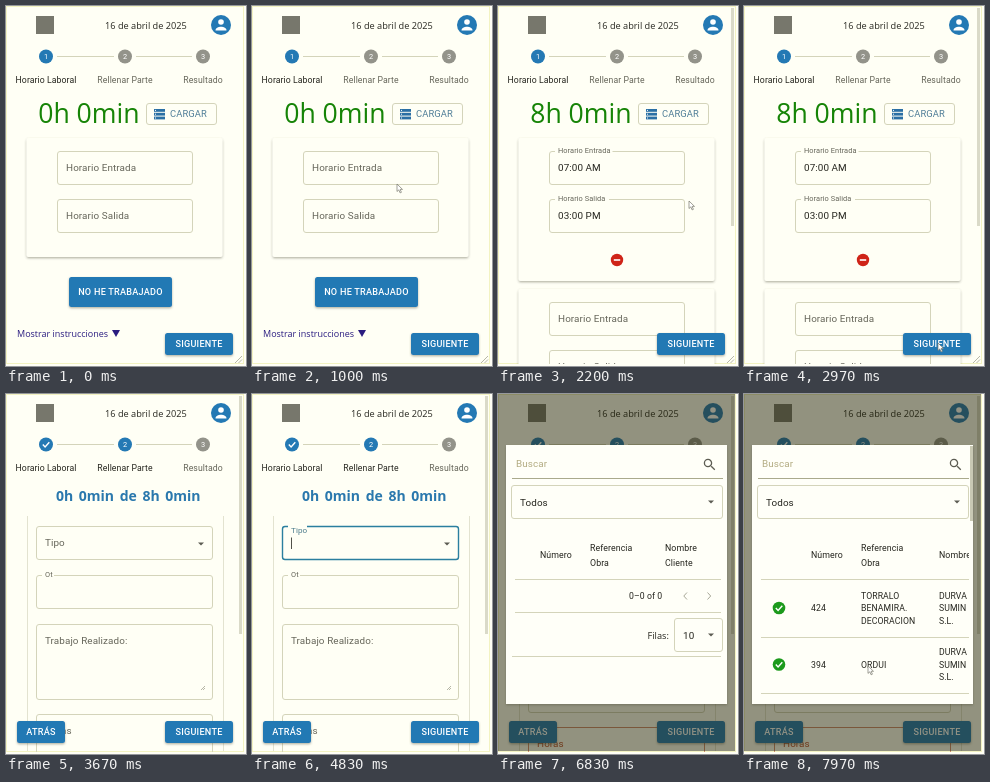
Recreate the animation shown at these times as an HTML page. Size 240 by 360 pixels, loop 8000 ms.

```html
<!DOCTYPE html>
<html lang="es">
<head>
<meta charset="utf-8">
<title>Parte de trabajo</title>
<style>
  html, body { margin: 0; width: 100%; height: 100%; overflow: hidden; background: #fffff5; }
  svg { display: block; width: 100vw; height: 100vh; }
  text { font-family: Roboto, Arial, sans-serif; letter-spacing: .009em; white-space: pre; }
  .humanist { font-family: "Open Sans", "Noto Sans", sans-serif; letter-spacing: 0; }
  .button { font-weight: 500; letter-spacing: .028em; }
</style>
</head>
<body>
<svg id="stage" viewBox="0 0 240 360">
  <defs>
    <filter id="shadow" x="-20%" y="-20%" width="140%" height="150%">
      <feDropShadow dx="0" dy="1.2" stdDeviation="1.1" flood-color="#555540" flood-opacity=".45"/>
    </filter>
    <clipPath id="table"><rect x="13" y="126" width="212" height="184"/></clipPath>
  </defs>
  <g id="scene"></g>
</svg>
<script>
const LOOP = 8000;
const PAPER = '#fffff5', INK = '#26261f', MUTED = '#66665a', LINE = '#d4d4ba';
const BLUE = '#2479b4', RED = '#b84c2c';

// Moments of the interaction, in ms
const LOADED = 1650, NEXT_PAGE = 3050, FOCUS = 4700, CHOSEN = 5250, DIALOG = 6400, ROWS = 7100;

const clamp = v => Math.max(0, Math.min(1, v));
const ease = v => { v = clamp(v); return v * v * (3 - 2 * v); };
const mix = (a, b, p) => a + (b - a) * p;

const text = (x, y, s, size = 9.9, fill = INK, extra = '') =>
  `<text x="${x}" y="${y}" font-size="${size}" fill="${fill}" ${extra}>${s}</text>`;
const rect = (x, y, w, h, fill, extra = '') =>
  `<rect x="${x}" y="${y}" width="${w}" height="${h}" fill="${fill}" ${extra}/>`;
const circle = (x, y, r, fill) => `<circle cx="${x}" cy="${y}" r="${r}" fill="${fill}"/>`;
const path = (d, stroke, width = 1, fill = 'none') =>
  `<path d="${d}" stroke="${stroke}" stroke-width="${width}" fill="${fill}"/>`;
const rule = (x1, x2, y, color = LINE) => path(`M${x1} ${y}H${x2}`, color);
const outline = (x, y, w, h, color = LINE, width = 1) =>
  rect(x + .5, y + .5, w - 1, h - 1, 'none', `rx="2.5" stroke="${color}" stroke-width="${width}"`);
const arrow = (x, y) => path(`M${x - 3} ${y - 1.5}h6l-3 3z`, 'none', 0, '#5c5c52');
const grip = (x, y, s) => path(`M${x} ${y}l${s} ${-s}M${x + s / 2} ${y}l${s / 2} ${-s / 2}`, '#a5a594', .8);
const check = (x, y) => path(`M${x - 3.2} ${y}l2.3 2.4l4.2 -4.6`, '#fff', 1.4);
const card = (y, h) => rect(20.5, y, 196, h, PAPER, 'rx="2" filter="url(#shadow)"');

function button(x, y, w, h, label) {
  return rect(x, y, w, h, BLUE, 'rx="2.5" filter="url(#shadow)"') +
    text(x + w / 2, y + h / 2 + 3.2, label, 9.1, '#fff', 'class="button" text-anchor="middle"');
}

// Outlined field whose label floats onto the border as `float` goes from 0 to 1
function field(x, y, w, h, label, { float = 0, value = '', color = LINE, labelColor = MUTED, width = 1 } = {}) {
  const size = mix(9.9, 7.4, float);
  const gap = label.length * 3.5 + 5;
  return outline(x, y, w, h, color, width) +
    (float > .3 ? rect(x + 6, y - 1, gap, 3, PAPER) : '') +
    text(x + 9, y + mix(20, 2.2, float), label, size, labelColor) +
    (value ? text(x + 9, y + 20, value) : '');
}

function header(page) {
  let out = rect(30, 10, 18, 18, '#77776c') +
    text(99, 23, '16 de abril de 2025', 9.2, INK, 'class="humanist"') +
    circle(215, 19, 10, BLUE) + circle(215, 16, 2.8, '#fff') +
    path('M209.5 24.5c0-5 11-5 11 0z', 'none', 0, '#fff') +
    rule(51, 108, 50.5) + rule(130, 186, 50.5);
  ['Horario Laboral', 'Rellenar Parte', 'Resultado'].forEach((label, i) => {
    const x = [40, 119, 197][i], reached = i <= page;
    out += circle(x, 50.5, 7, reached ? BLUE : '#93938a') +
      (i < page ? check(x, 50.5) : text(x, 53.2, i + 1, 7.4, '#fff', 'text-anchor="middle"')) +
      text(x, 77, label, 8.7, reached ? INK : MUTED, 'text-anchor="middle"');
  });
  return out;
}

function schedulePage(t) {
  const loaded = t >= LOADED;
  const float = ease((t - LOADED) / 200);
  const pair = (y, f, times) =>
    field(51, y, 136, 34, 'Horario Entrada', { float: f, value: times[0] }) +
    field(51, y + 48, 136, 34, 'Horario Salida', { float: f, value: times[1] });
  const bars = [103, 106.8, 110.6].map(y => rect(148, y, 11, 2.8, '#2a6fa5') + rect(149, y + .9, 1, 1, '#fff')).join('');
  let out = text(32.2, 117, (loaded ? 8 : 0) + 'h 0min', 26.6, '#168406', 'class="humanist" font-weight="500"') +
    outline(140, 97, 71, 22) + bars +
    text(164, 111.3, 'CARGAR', 9.4, '#4d7c96', 'letter-spacing=".25"') +
    card(132, loaded ? 143 : 119) + pair(145, float, loaded ? ['07:00 AM', '03:00 PM'] : ['', '']);
  if (loaded) {
    out += circle(119, 254, 6.2, '#cf2418') + rect(115.8, 253.2, 6.4, 1.6, '#fff') +
      card(283, 120) + pair(296, 0, ['', '']) + rect(233, 2, 3, 218, '#dadac8');
  } else {
    out += button(63, 271, 103, 30, 'NO HE TRABAJADO') +
      text(11, 331, 'Mostrar instrucciones', 9, '#2a1c80', 'class="humanist"') +
      path('M106 324h8l-4 7z', 'none', 0, '#2a1c80');
  }
  return out + grip(229, 357, 7) + button(159, 327, 68, 22, 'SIGUIENTE');
}

function reportPage(t) {
  const focused = t >= FOCUS, chosen = t >= CHOSEN;
  const shift = chosen ? 13 : 0;
  const alarm = chosen ? RED : MUTED;
  const caret = focused && t < DIALOG && (t - CHOSEN + 1060) % 1060 < 800;
  return text(50, 107, '0h 0min de 8h 0min', 14, '#2a78ad', 'class="humanist" font-weight="700" word-spacing="2"') +
    path('M21.5 122V357M217.5 122V357', '#e3e3d0') +
    field(30, 132, 177, 34, 'Tipo', {
      float: ease((t - FOCUS) / 200), value: chosen ? 'montaje' : '',
      color: focused ? '#2b7f9f' : LINE, labelColor: focused ? '#4d7c8c' : MUTED, width: focused ? 1.4 : 1
    }) +
    (caret ? rect(chosen ? 75.3 : 39, 143.5, .8, 11.5, INK) : '') +
    (chosen ? path('M176 147l6 6m0 -6l-6 6', '#5c5c52') : '') + arrow(195, 150) +
    field(30, 181, 177, 34, 'Ot', { float: 1, color: chosen ? '#d08a6c' : LINE, labelColor: alarm }) +
    (chosen ? text(39, 225, 'Seleccione una OT', 7.5, RED) : '') +
    field(30, 230 + shift, 177, 76, 'Trabajo Realizado:') + grip(195, 296 + shift, 4) +
    field(30, 320 + shift, 177, 60, 'Horas', { color: chosen ? '#d08a6c' : LINE, labelColor: alarm }) +
    rect(233, 2, 3, 238, '#dadac8') +
    button(11, 327, 48, 22, 'ATRÁS') + button(159, 327, 68, 22, 'SIGUIENTE');
}

function emptyTable() {
  const heads = [[42, 164, 'Número'], [92, 157, 'Referencia'], [92, 172, 'Obra'], [167, 157, 'Nombre'], [167, 172, 'Cliente']];
  return heads.map(([x, y, s]) => text(x, y, s, 8.8)).join('') +
    rule(17, 223, 185.5) + text(131, 205, '0–0 of 0', 8.7) +
    path('M189 198.5l-3.2 3.5l3.2 3.5M209.5 198.5l3.2 3.5l-3.2 3.5', '#a8a898') +
    rule(17, 223, 218.5) + text(149.5, 244.5, 'Filas:', 9.2, INK, 'class="humanist"') +
    outline(176, 224, 49, 34) + text(185, 244.5, '10') + arrow(213, 241) + rule(14, 223, 262.5);
}

function filledTable() {
  const lines = (x, y, list) => list.map((s, i) => text(x, y + i * 12.5, s, 8.7)).join('');
  const row = (y, id, work) => circle(35, y, 6.3, '#1c9a1c') + check(35, y) +
    text(67, y + 3, id, 8.7) + lines(117, y + 3 - (work.length - 1) * 6.25, work) +
    lines(195, y - 9.5, ['DURVA', 'SUMIN', 'S.L.']);
  const head = (x, y, s) => text(x, y, s, 8.8);
  return `<g clip-path="url(#table)">` +
    head(67, 164, 'Número') + head(117, 157, 'Referencia') + head(117, 172, 'Obra') + head(195, 164, 'Nombre Cliente') +
    rule(17, 225, 185.5) + row(214, '424', ['TORRALO', 'BENAMIRA.', 'DECORACION']) +
    rule(17, 225, 243.5) + row(270.5, '394', ['ORDUI']) + rule(17, 225, 299.5) + '</g>' +
    rect(226, 52, 3, 75, '#c9c9b4');
}

function dialog(t) {
  return `<g opacity="${ease((t - DIALOG) / 225)}">` + rect(0, 0, 237, 357, '#26260a', 'opacity=".5"') +
    rect(8, 51, 221, 259, '#fffff8', 'filter="url(#shadow)"') +
    text(18, 73, 'Buscar', 9.9, '#b3ac82') +
    path('M213.2 72.2l3.6 3.6M213.6 69a3.6 3.6 0 1 0 -7.2 0a3.6 3.6 0 1 0 7.2 0', '#5c5c52', 1.3) +
    rule(14, 225, 84.5, '#aaaa8c') + outline(13, 91, 212, 34) + text(22, 111.5, 'Todos') + arrow(213, 108) +
    (t < ROWS ? emptyTable() : filledTable()) + '</g>';
}

// Pointer way points: [time, x, y]
const trips = [
  [[600, 146, 215], [1000, 145, 178], [1500, 178, 106], [1750, 178, 106], [2200, 191, 195], [2800, 194, 337], [3100, 194, 337]],
  [[7250, 122, 225], [7700, 124, 268], [8000, 124, 272]]
];

function pointer(t) {
  const trip = trips.find(p => t >= p[0][0] && t < p[p.length - 1][0]);
  if (!trip) return '';
  const i = trip.findIndex(p => p[0] > t);
  const [a, b] = [trip[i - 1], trip[i]];
  const p = ease((t - a[0]) / (b[0] - a[0]));
  return `<g transform="translate(${mix(a[1], b[1], p)} ${mix(a[2], b[2], p)})">` +
    path('M0 0v7.5l1.8-1.6l1.3 3l1.3-.6l-1.3-2.9h2.4z', '#77776a', .7, '#fff') + '</g>';
}

const scene = document.getElementById('scene');
function draw(now) {
  const t = now % LOOP;
  const page = t < NEXT_PAGE ? 0 : 1;
  scene.innerHTML = rect(.5, .5, 237, 357, PAPER, 'stroke="#f3f3c2"') + header(page) +
    (page ? reportPage(t) : schedulePage(t)) + (t >= DIALOG ? dialog(t) : '') + pointer(t) +
    rect(238, 0, 2, 360, PAPER) + rect(0, 358, 240, 2, PAPER);
}

const start = performance.now();
function tick() {
  draw(performance.now() - start);
  requestAnimationFrame(tick);
}
tick();
</script>
</body>
</html>
```
